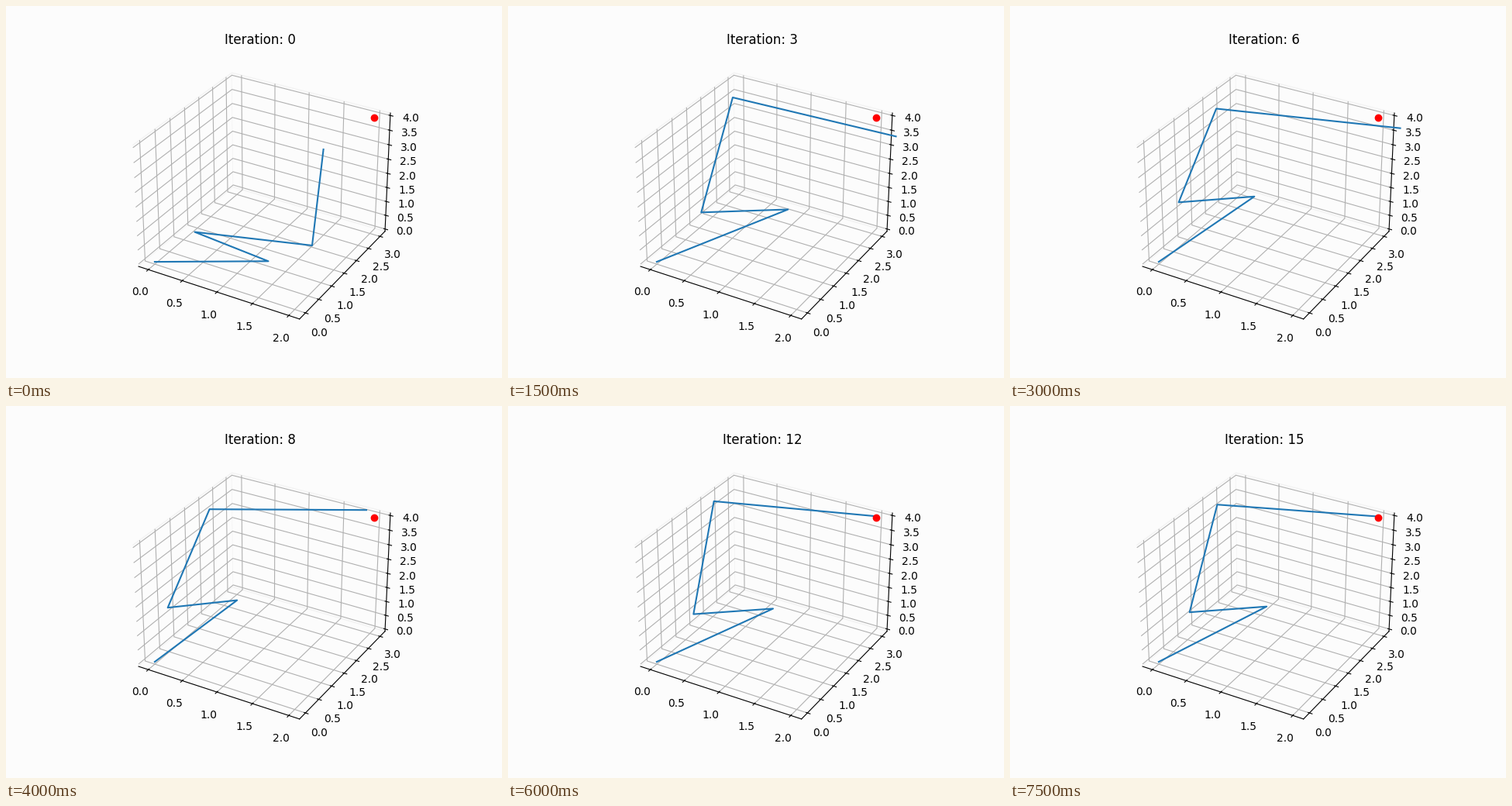
A matplotlib script for the animation above (8 s loop, 640 by 480 pixels).

```python
import matplotlib.pyplot as plt
import numpy as np
from matplotlib.animation import FuncAnimation
from matplotlib.lines import Line2D
from matplotlib.transforms import IdentityTransform

W, H, DPI = 640, 480, 100
PAPER = "#fcfcfc"
GOAL = (2, 3, 4)
STALLS = (1, 5, 11)  # iterations that bring no improvement

# Arm poses on the stage: three elbows and the tip, after the fixed base.
BASE = (191.9, 330.1)
START = np.array([(338.5, 329.3), (243.5, 291.6), (395, 309), (409.6, 185)])
REACH = np.array([(388, 277.4), (268.7, 279.3), (308.6, 107.6), (480.5, 166.7)])
FAR = np.array([(337.2, 250.3), (232, 256), (274, 126.9), (514, 167.6)])
FOLD = np.array([(298.2, 250.6), (208.7, 260.2), (262.6, 133.2), (465, 134.2)])
HIGH = np.array([(356, 265), (249.2, 272), (261.6, 116), (477, 140.6)])
LOW = np.array([(322, 256.4), (225.2, 264), (269.6, 131.4), (475.5, 143.4)])
REST = LOW + 0.27 * (HIGH - LOW)

TIMES = np.array([1, 3, 6, 8, 10, 12])
KEYS = np.array([REACH, FAR, FOLD, HIGH, LOW, REST])
SLOPES = np.gradient(KEYS, TIMES, axis=0)


def pose(step):
    """The arm after a number of accepted steps, on a smooth path through KEYS."""
    if step == 0:
        return START
    k = min(np.searchsorted(TIMES, step, side="right") - 1, len(TIMES) - 2)
    span = TIMES[k + 1] - TIMES[k]
    t = (step - TIMES[k]) / span
    ease = t * t * (3 - 2 * t)
    bend = t * (1 - t) * ((1 - t) * SLOPES[k] - t * SLOPES[k + 1])
    return KEYS[k] + ease * (KEYS[k + 1] - KEYS[k]) + span * bend


def padded(top, margin):
    """Limits around 0..top with a data margin and the 3D view margin."""
    pad = top * margin
    pad += (top + 2 * pad) / 48
    return -pad, top + pad


fig = plt.figure(figsize=(W / DPI, H / DPI), dpi=DPI, facecolor=PAPER)
ax = fig.add_subplot(projection="3d", facecolor=PAPER)
ax.plot(*[[c] for c in GOAL], "ro", zorder=3)
ax.set_xlim(*padded(GOAL[0], 0.05))
ax.set_ylim(*padded(GOAL[1], 0.05))
ax.set_zlim(*padded(GOAL[2], 0))
for axis in (ax.xaxis, ax.yaxis, ax.zaxis):
    axis.set_pane_color(PAPER)
    axis.pane.set_edgecolor("#f3f3f3")

arm = Line2D([], [], color="C0", lw=1.5, zorder=2, transform=IdentityTransform())
ax.add_artist(arm)
title = ax.set_title("")


def update(i):
    step = i - sum(i >= s for s in STALLS)
    x, y = np.vstack([BASE, pose(step)]).T
    arm.set_data(x, H - y)
    title.set_text(f"Iteration: {i}")
    return arm, title


anim = FuncAnimation(fig, update, frames=16, interval=500, repeat=True, repeat_delay=0)
plt.show()
```
